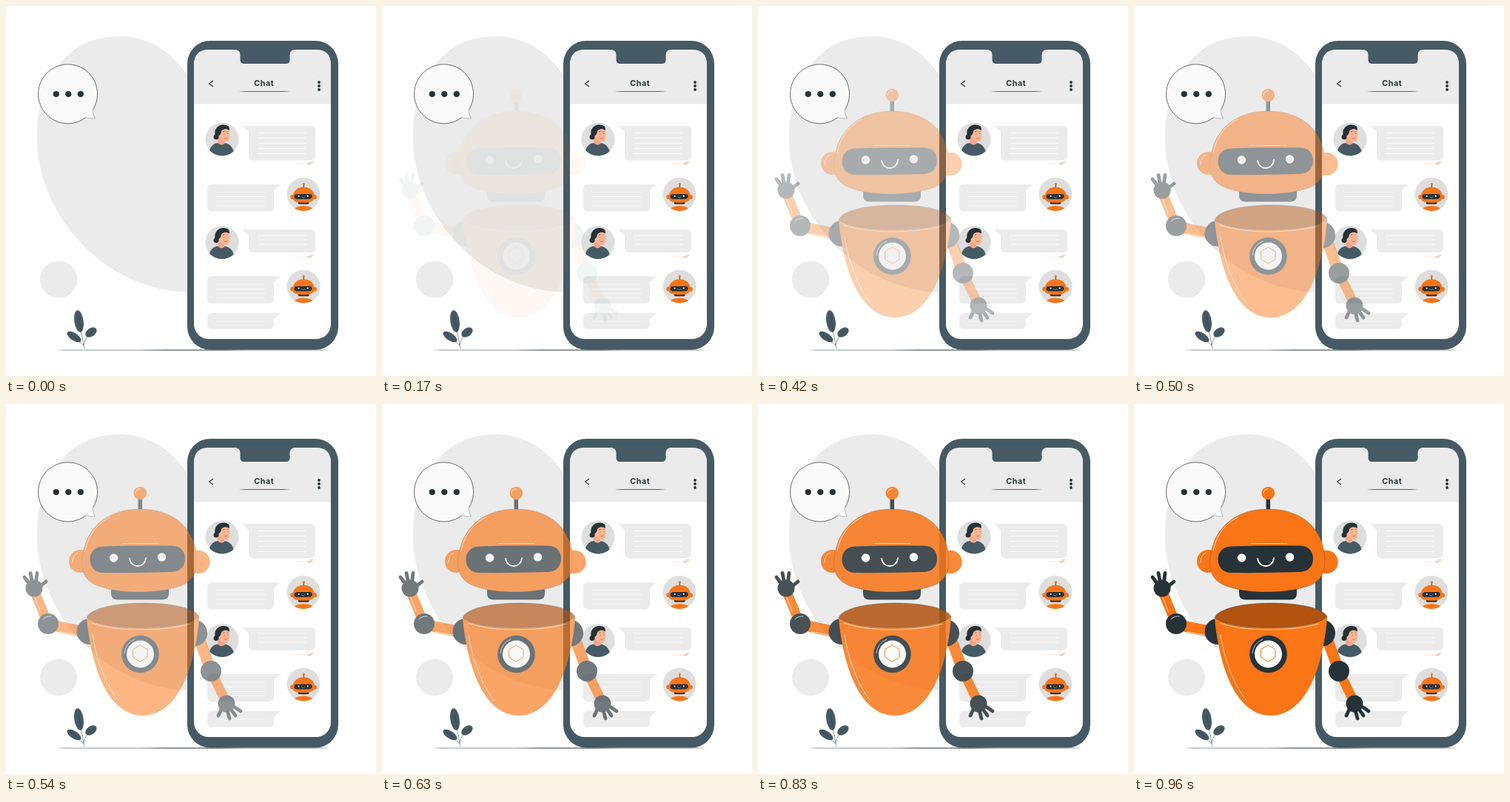
Animation of 500 by 500 pixels, one loop 1000 ms. Source, as an HTML page:

```html
<!DOCTYPE html>
<html lang="en">
<head>
<meta charset="utf-8">
<title>Chat assistant</title>
<style>
html, body { margin: 0; width: 100%; height: 100%; overflow: hidden; background: #fff; }
svg { display: block; width: 100%; height: 100%; }
.o { fill: #f97516; } .d { fill: #263238; } .g { fill: #ebebeb; } .s { fill: #455a64; } .w { fill: #fff; }
.line { fill: none; stroke: #263238; stroke-width: .7; }
.shine { fill: none; stroke: #fff; stroke-width: .7; stroke-linecap: round; }
.limb { fill: none; stroke: #f97516; stroke-width: 15; }
.finger { fill: none; stroke: #263238; stroke-width: 4.8; stroke-linecap: round; }
</style>
</head>
<body>
<svg viewBox="0 0 500 500">
  <defs>
    <clipPath id="round"><circle r="22.5"/></clipPath>
    <g id="head">
      <path class="d" d="M178.5 126h5.5v20h-5.5zM142 250h78v6q0 8.500-8.500 8.500h-61q-8.500 0-8.500-8.500z"/>
      <circle class="o" cx="181.3" cy="120.5" r="8.8"/>
      <path class="shine" d="M175 120Q176 115 181 114.5"/>
      <circle class="o" cx="100.5" cy="212.5" r="15.5"/>
      <circle class="o" cx="260" cy="213.5" r="15.7"/>
      <path class="shine" d="M90 214Q90 204 97 201"/>
      <path class="o" stroke="#263238" stroke-opacity=".5" stroke-width=".5"
        d="M181 142C224 142 252 165 257 200C261 227 253 242 229 248C200 256 157 256 131 248C108 242 99 228 104 202C110 165 139 142 181 142Z"/>
      <path class="d" d="M131 192.5Q178 190.500 225 191.5C236 192 242 199 242 209S236 226 225 227Q178 228.500 131 228C120 228 113.5 220 113.5 210S120 193 131 192.5Z"/>
      <circle class="w" cx="145.5" cy="208" r="5.8"/>
      <circle class="w" cx="210.5" cy="207" r="5.8"/>
      <path class="shine" style="stroke-width:1.8" d="M167 209C169 222.5 188 222.5 189 208"/>
      <path class="shine" d="M158 188.5H206M107 198C111 178 122 162 140 153"/>
    </g>
    <g id="bot">
      <circle r="22.5" fill="#dedede"/>
      <g clip-path="url(#round)">
        <ellipse class="o" cy="21" rx="12.5" ry="5.5"/>
        <use href="#head" transform="translate(0 3) scale(.188) translate(-180 -210)"/>
      </g>
    </g>
    <g id="woman">
      <circle r="22.5" fill="#dedede"/>
      <g clip-path="url(#round)">
        <path class="s" d="M-18.500 24C-18 10-12 6-6 5L3 5C10 6 16 10 17 24Z"/>
        <path fill="#f5a583" d="M-5-4L3 0L3.5 6Q-1 10-6 5Z"/>
        <path fill="#ffb596" d="M-6-5C-5-13 3-16 9-13C11-8 11 0 8 2.5C4 4.5-1 3-3-1Z"/>
        <path class="d" d="M-9-4C-12-14-5-20 2-19.500C8-20 11-16 9.5-12C6-15 1-14-1-11C-1-8-3-6-5-4Z"/>
        <circle class="d" cx="-8" cy="-3" r="3.5"/>
        <path class="line" style="stroke-width:.6" d="M1-10l2.5-.6M7-10.500l1.500-.2M2.500-7h.8M7.500-7.500h.8"/>
        <path fill="none" stroke="#e45b38" stroke-width=".8" d="M3-1.500Q5 0 7-2"/>
      </g>
    </g>
  </defs>

  <path class="g" d="M152 41C86 41 42 95 42 178C42 280 130 385 250 387V103C230 65 195 41 152 41Z"/>
  <circle class="g" cx="71" cy="369.5" r="25"/>

  <path fill="#fafafa" d="M117.5 140Q117 147 120.500 152Q114 152.5 108 150.500A40 40 0 1 1 117.5 140Z"/>
  <path class="line" d="M108 150.5A40 40 0 1 1 117.5 140"/>
  <path class="line" style="stroke-width:.3" d="M117.5 140Q117 147 120.500 152Q114 152.5 108 150.5"/>
  <g class="d"><circle cx="67.8" cy="119" r="4.1"/><circle cx="84.3" cy="119" r="4.1"/><circle cx="100.8" cy="119" r="4.1"/></g>

  <g class="s">
    <ellipse rx="6.2" ry="14.8" transform="translate(98.5 426) rotate(-8)"/>
    <ellipse rx="11" ry="5" transform="translate(92 447) rotate(33)"/>
    <ellipse rx="8.500" ry="5.500" transform="translate(115 441) rotate(-35)"/>
  </g>
  <path class="line" style="stroke-width:.5" d="M98 418Q101 440 106 463M86 442Q97 452 105 459M119 438Q107 446 105 458"/>

  <rect class="s" x="245" y="47" width="204" height="417.5" rx="31"/>
  <rect class="w" x="254" y="59" width="185" height="391" rx="20"/>
  <path class="g" d="M254 132.5V79Q254 59 274 59H419Q439 59 439 79V132.5Z"/>
  <path class="s" d="M308 58.5Q316.5 59 316.5 66V73Q316.5 78 322 78H378Q383.5 78 383.5 73V66Q383.5 59 392 58.5Z"/>
  <ellipse class="d" cx="252.5" cy="465" rx="188.5" ry=".4"/>
  <path class="line" style="stroke-width:1.1" d="M280 101L274.5 105L280 109"/>
  <text class="d" x="348.8" y="108.3" text-anchor="middle" font-family="Inter, sans-serif" font-weight="700" font-size="10.6" letter-spacing=".6">Chat</text>
  <ellipse class="d" cx="349" cy="115.4" rx="35" ry=".4"/>
  <g class="d"><circle cx="423" cy="103" r="1.9"/><circle cx="423" cy="108" r="1.9"/><circle cx="423" cy="113" r="1.9"/></g>
  <g id="chat"></g>
  <use href="#woman" x="292" y="180"/>
  <use href="#bot" x="402" y="254.5"/>
  <use href="#woman" x="292" y="319.5"/>
  <use href="#bot" x="402" y="379"/>

  <g id="robot" opacity="0">
    <path class="limb" d="M104 307Q80 304 57 297M262 320L277 361"/>
    <path class="limb" style="stroke-width:13" d="M55 293L39 254M279 365L297 402"/>
    <path class="finger" d="M34 246L25 234M36 244L33 228.5M40 244L42 228.500M43 249L54 240M294 406L287 421M298 410L302 425M301 408L310 421M302 405L317 415"/>
    <g class="d">
      <circle cx="113" cy="307.5" r="17.5"/><circle cx="254" cy="309.5" r="18"/>
      <circle cx="57" cy="297" r="14"/><circle cx="277" cy="361" r="14"/>
      <circle cx="38" cy="249" r="11.5"/><circle cx="298" cy="405" r="11.5"/>
    </g>
    <path class="shine" d="M50 291Q54 286 61 287M39 262L46 280M72 308L95 312"/>
    <use href="#head"/>
    <path class="o" d="M109 289C130 301 155 302 185 302S245 299 261 288C257 345 236 421 185 421S114 345 109 289Z"/>
    <path fill="#b2530f" stroke="#263238" stroke-width=".4" d="M109 289C118 262.5 252 262.5 261 288C245 299 215 302 185 302S130 301 109 289Z"/>
    <path class="shine" d="M116 296Q140 305 182 305Q222 305 250 297M117 312C122 345 135 380 152 401"/>
    <circle class="d" cx="181.5" cy="338" r="25.3"/>
    <circle class="w" cx="181.5" cy="338" r="18.5"/>
    <path fill="none" stroke="#f97516" d="M181.5 326L191 331.5V342.5L181.5 348L171.5 342.5V331.5Z"/>
    <path class="shine" d="M160 337Q161 323 174 318"/>
  </g>
</svg>
<script>
// x, top, height, side of tail, first text line, line gap, line count
const bubbles = [
  [328, 162, 46.5, -1, 171.5, 7, 5],
  [272, 241, 36.5, 1, 251.5, 6.2, 4],
  [328, 302, 31, -1, 310, 6, 3],
  [272, 365, 37, 1, 376, 6.2, 4],
  [272, 415, 21.5, 1, 426, 6, 1]
];
const bubble = ([x, y, h, side, first, gap, n]) => {
  const edge = side > 0 ? x + 90 : x;
  let lines = '';
  for (let i = 0; i < n; i++) lines += `M${x + 12.5} ${first + gap * i}h65`;
  return `<rect class="g" x="${x}" y="${y}" width="90" height="${h}" rx="6"/>
    <path class="g" d="M${edge + 9 * side} ${y}H${edge - 8 * side}V${y + 10}H${edge}V${y + 8}Z"/>
    <path class="shine" d="${lines}"/>`;
};
const tick = y => `<g fill="none" stroke="#f97516" stroke-width=".7">
  <path stroke-opacity=".4" stroke-width=".5" d="M392 ${y + 1}h12"/>
  <path d="M407 ${y}l1.5 2 4-4M410 ${y + 1}l1 1 4-4"/></g>`;
document.getElementById('chat').innerHTML = bubbles.map(bubble).join('') + tick(212) + tick(338);

// Fade stops: step of 24 per second, opacity
const stops = [[3, 0], [7, .185], [10, .34], [12, .465], [15, .65], [18, .81], [23, 1]];
const fade = step => {
  if (step <= 3) return 0;
  const i = stops.findIndex(s => s[0] >= step);
  const [a, u] = stops[i - 1], [b, v] = stops[i];
  return u + (v - u) * (step - a) / (b - a);
};

const robot = document.getElementById('robot');
function draw() {
  const t = performance.now() % 1000;
  const step = Math.min(23, Math.floor((t + 2) * .024));
  robot.setAttribute('opacity', fade(step));
  requestAnimationFrame(draw);
}
draw();
</script>
</body>
</html>
```
